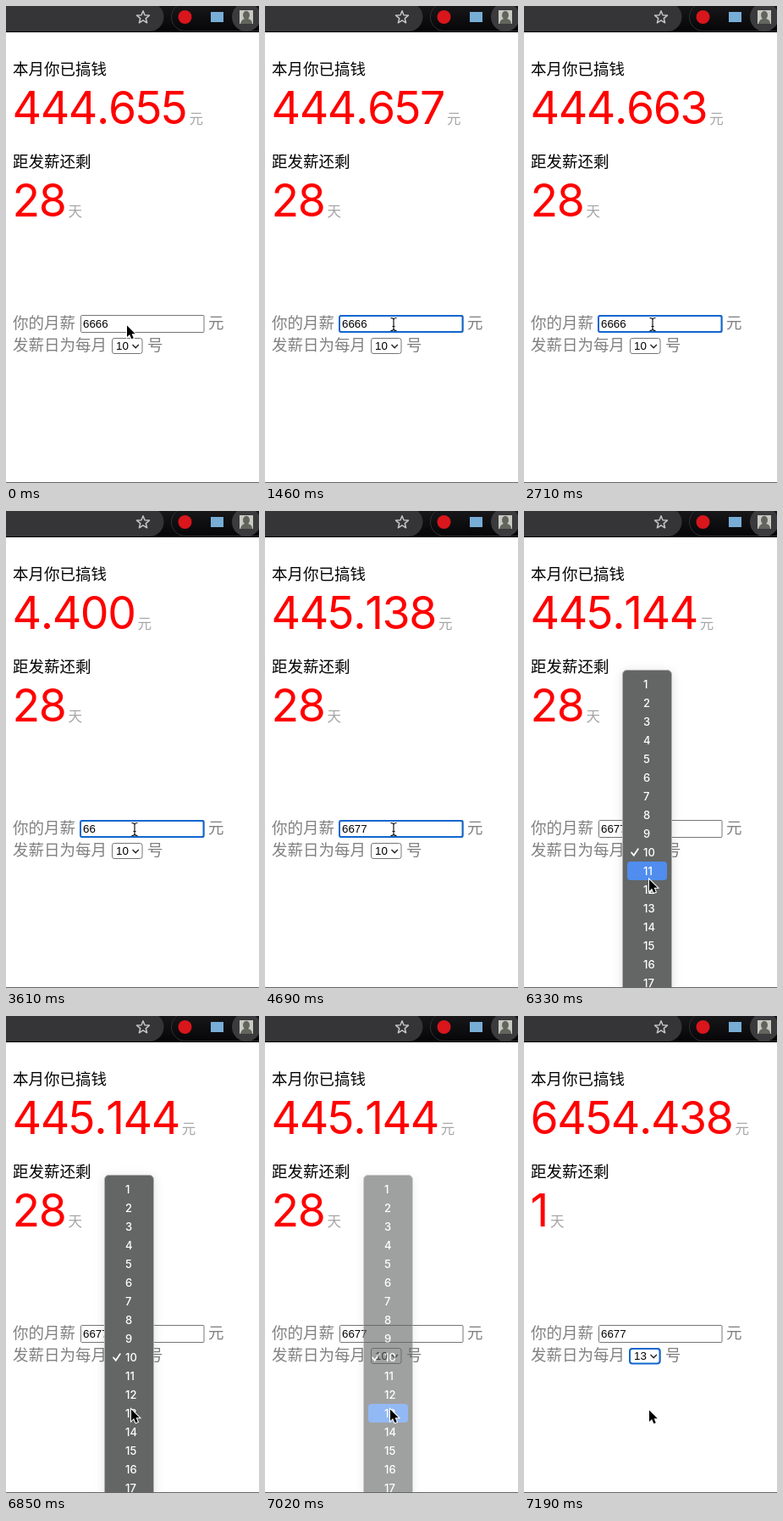
Write an HTML page that moves like this. It is 299 px wide and 562 px high and loops after 8000 ms.

```html
<!DOCTYPE html>
<html lang="zh-CN">
<head>
<meta charset="utf-8">
<title>搞钱</title>
<style>
  html, body { margin: 0; width: 100%; height: 100%; overflow: hidden; background: #fff; }
  svg { display: block; width: 100%; height: 100%; }
  text { white-space: pre; }
  .label { font: 500 18.5px "Noto Sans CJK SC", "Noto Sans CJK", sans-serif; }
  .grey { fill: #808080; }
  .big { font: 53.5px Inter, sans-serif; font-optical-sizing: none; font-kerning: none;
    font-feature-settings: "calt" 0; letter-spacing: -1.4px; fill: #f00; }
  .unit { font: 16.5px "Noto Sans CJK SC", "Noto Sans CJK", sans-serif; fill: #a6a6a6; letter-spacing: 0; }
  .field { font: 13.33px "Liberation Sans", Arial, sans-serif; }
  .item { font: 500 13px Inter, sans-serif; fill: #fff; }
  .box { fill: #fff; stroke: #767676; }
  .ring { fill: none; stroke: #1067cf; stroke-width: 2; }
</style>
</head>
<body>
<svg viewBox="0 0 299 562">
  <defs>
    <linearGradient id="bar" x2="0" y2="1">
      <stop stop-color="#17171a"/><stop offset="1" stop-color="#050507"/>
    </linearGradient>
    <filter id="shadow" x="-50%" width="200%" y="-10%" height="120%">
      <feDropShadow dx="0" dy="2" stdDeviation="6" flood-opacity=".13"/>
    </filter>
  </defs>

  <!-- Browser toolbar -->
  <rect width="299" height="31" fill="url(#bar)"/>
  <rect x="-40" y="-4" width="226.5" height="34" rx="17" fill="#353538"/>
  <rect x="195.5" y="-3.5" width="120" height="33" rx="16.5" fill="none" stroke="#303033"/>
  <circle cx="284" cy="13" r="17" fill="#3b3b3e"/>
  <path id="star" fill="none" stroke="#c4c4c6" stroke-width="1.5" stroke-linejoin="round"/>
  <circle cx="211.5" cy="13" r="8" fill="#d8161c"/>
  <rect x="242" y="7" width="15" height="12" fill="#78add6"/>
  <rect x="276" y="5" width="16" height="16" fill="#c9cac2"/>
  <path d="M277 21q1-5 5-6a4 5 0 1 1 4 0q5 1 5 6Z" fill="#62655d"/>

  <!-- Page -->
  <text class="label" x="8" y="81">本月你已搞钱</text>
  <text class="big" x="7.5" y="139.2"><tspan id="earned"></tspan><tspan class="unit" dx="3">元</tspan></text>
  <text class="label" x="8" y="190">距发薪还剩</text>
  <text class="big" x="7.5" y="248.2"><tspan id="days"></tspan><tspan class="unit" dx="3">天</tspan></text>

  <text class="label grey" x="8" y="380">你的月薪</text>
  <text class="label grey" x="239" y="380">元</text>
  <rect class="box" x="88.5" y="364.5" width="145.5" height="20" rx="1"/>
  <rect id="inputRing" class="ring" x="88" y="365" width="145.5" height="19" rx="2"/>
  <text id="salary" class="field" x="91" y="379.4"></text>
  <rect id="caret" y="367" width="1" height="15"/>

  <text class="label grey" x="8" y="406">发薪日为每月</text>
  <text class="label grey" x="167" y="406">号</text>
  <rect class="box" x="125.5" y="391.5" width="35.5" height="18" rx="2.5"/>
  <rect id="selectRing" class="ring" x="125" y="392" width="35.5" height="17.5" rx="3"/>
  <text id="payday" class="field" x="130" y="405.2"></text>
  <path d="M149.5 399l3.7 3.7 3.7-3.7" fill="none" stroke="#222" stroke-width="1.4"/>

  <g id="menu">
    <rect x="116.5" y="187.5" width="58" height="420" rx="5" fill="#636665" stroke="#b0b2b1" filter="url(#shadow)"/>
    <rect id="highlight" x="122" width="47" height="22" rx="4" fill="#508dee"/>
    <path d="M127 402.5l2.8 3.2 5-7.5" fill="none" stroke="#fff" stroke-width="1.8" stroke-linecap="round"/>
  </g>

  <rect y="561" width="299" height="1" fill="#666"/>

  <path id="arrow" d="M0 .5V14L3.1 11.1 5.4 16.2 7.8 15.2 5.6 10.2H9.8Z" stroke="#fff" stroke-width="2" paint-order="stroke"/>
  <path id="beam" d="M-3.5-7.5Q0-7.5 0-5.5Q0-7.5 3.5-7.5M0-5.5V5.5M-3.5 7.5Q0 7.5 0 5.5Q0 7.5 3.5 7.5M-1.5 2.5H1.5" fill="none" stroke="#000" stroke-width="1.1"/>
</svg>
<script>
const LOOP = 8000;
const $ = id => document.getElementById(id);

// Hard changes: [start time, value]
const earned = [[0, "444.655"], [740, "444.657"], [1700, "444.660"], [2710, "444.663"],
  [3310, "44.400"], [3610, "4.400"], [4090, "44.467"], [4210, "445.138"],
  [5210, "445.141"], [6220, "445.144"], [7190, "6454.438"]];
const salary = [[0, "6666"], [3310, "666"], [3610, "66"], [4090, "667"], [4210, "6677"]];
const caretOn = [[0, 0], [920, 1], [1460, 0], [1940, 1], [2410, 0], [2950, 1], [3430, 0],
  [3910, 1], [4690, 0], [5170, 1], [5510, 0]];
const menuOpacity = [[0, 0], [5510, 1], [6960, .9], [7020, .61], [7070, .3], [7190, 0]];

// Pointer path: [time, x, y]
const path = [[4870, 152, 375], [5100, 148, 423], [5270, 148, 404],
  [6050, 148, 404], [6610, 148, 463], [7130, 148, 463], [7190, 148, 464]];

const at = (steps, t) => steps.findLast(step => step[0] <= t)[1];
const show = (id, on) => $(id).setAttribute("visibility", on ? "visible" : "hidden");
const itemY = day => 402 + 22 * (day - 10);

function pointer(t) {
  if (t < 680) return [143, 376];
  const next = path.findIndex(key => key[0] > t);
  if (next === 0) return path[0].slice(1);
  if (next < 0) return path.at(-1).slice(1);
  const [t0, x0, y0] = path[next - 1], [t1, x1, y1] = path[next];
  const u = (t - t0) / (t1 - t0), ease = u * u * (3 - 2 * u);
  return [x0 + (x1 - x0) * ease, y0 + (y1 - y0) * ease];
}

function draw(t) {
  const done = t >= 7190, amount = at(salary, t);
  $("earned").textContent = at(earned, t);
  $("days").textContent = done ? "1" : "28";
  $("salary").textContent = amount;
  $("payday").textContent = done ? "13" : "10";
  $("caret").setAttribute("x", Math.round(91 + amount.length * 7.41));
  show("caret", at(caretOn, t));
  show("inputRing", t >= 920 && t < 5510);
  show("selectRing", done);

  // The highlighted row trails the pointer and blinks once on click.
  $("menu").setAttribute("opacity", at(menuOpacity, t));
  const hovered = Math.round((pointer(t - 60)[1] - 402) / 22) + 10;
  $("highlight").setAttribute("y", itemY(hovered) - 11);
  $("highlight").setAttribute("opacity", t >= 6850 && t < 6910 ? 0 : 1);

  const [x, y] = pointer(t), typing = t >= 680 && y < 386;
  for (const id of ["arrow", "beam"]) {
    $(id).setAttribute("transform", `translate(${x} ${y})`);
    show(id, (id === "beam") === typing);
  }
}

const starPoints = Array.from({ length: 10 }, (_, i) => {
  const r = i % 2 ? 3.4 : 7.8, a = i * Math.PI / 5;
  return `${162 + r * Math.sin(a)} ${13.5 - r * Math.cos(a)}`;
});
$("star").setAttribute("d", `M${starPoints.join("L")}Z`);

for (let day = 1; day <= 17; day++) {
  const item = document.createElementNS("http://www.w3.org/2000/svg", "text");
  item.setAttribute("class", "item");
  item.setAttribute("x", 141);
  item.setAttribute("y", itemY(day) + 4.7);
  item.textContent = day;
  $("menu").append(item);
}

function frame() {
  draw(performance.now() % LOOP);
  requestAnimationFrame(frame);
}
frame();
</script>
</body>
</html>
```
